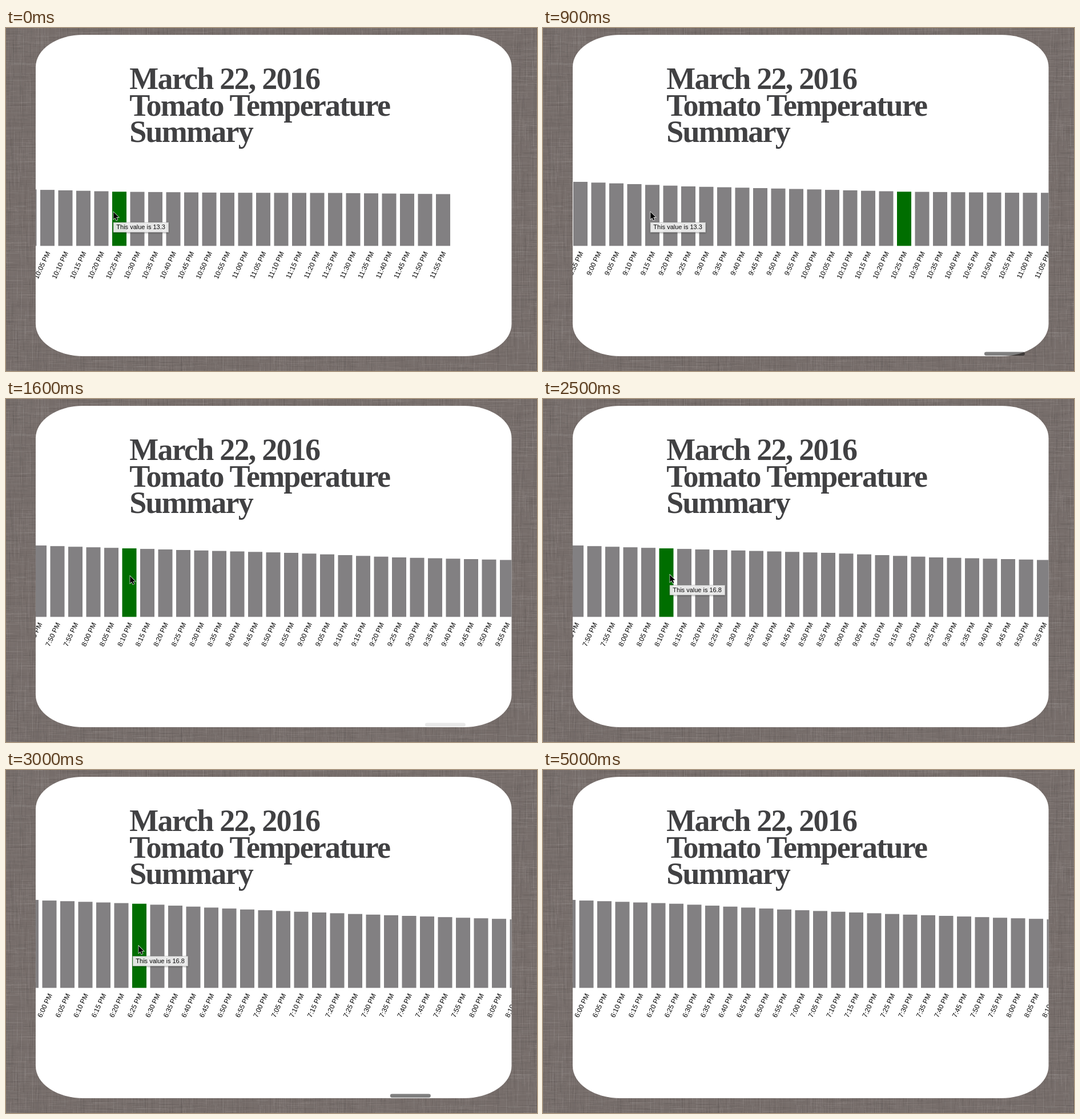
Recreate the animation shown at these times as an HTML page with a canvas. Size 930 by 602 pixels, loop 5.1 s.

```html
<!DOCTYPE html>
<html lang="en">
<head>
<meta charset="utf-8">
<title>Temperature Summary</title>
<style>
  html, body { margin: 0; width: 100%; height: 100%; overflow: hidden; background: #776e6b; }
  canvas, svg { position: absolute; left: 0; top: 0; width: 930px; height: 602px; display: block; }
  .title { font: bold 54px "Liberation Serif", Times, serif; letter-spacing: -1.75px; fill: #414143; }
  .label { font: 12px "Liberation Sans", Arial, sans-serif; text-anchor: end; }
  .tip text { font: 11px "Liberation Sans", Arial, sans-serif; }
  .tip rect { fill: #ececec; stroke: #c4c4c4; stroke-width: .6; }
  .tip { filter: drop-shadow(0 1.5px 1.5px rgba(0, 0, 0, .4)); opacity: .95; }
  .bar { fill: #828082; }
  .bar.hot { fill: #006e00; }
</style>
</head>
<body>
<canvas id="linen" width="930" height="602"></canvas>
<svg viewBox="0 0 930 602">
  <clipPath id="view"><rect x="52" y="12" width="833.5" height="564"/></clipPath>
  <rect x="52" y="12" width="833.5" height="564" rx="83.3" ry="56.4" fill="#fff"/>
  <g class="title">
    <text x="216.3" y="107">March 22, 2016</text>
    <text x="216.3" y="153.7">Tomato Temperature</text>
    <text x="216.3" y="200.4">Summary</text>
  </g>
  <g clip-path="url(#view)"><g id="chart"></g></g>
  <rect id="thumb" y="568.5" width="71" height="6.5" rx="3.2"/>
  <g id="tip" class="tip">
    <rect x=".3" y=".3" width="96.6" height="17"/>
    <text x="5.5" y="12.4"></text>
  </g>
  <path id="cursor" d="M0 0V12.6L2.9 9.9 4.9 14.6 7 13.7 5 9.1H9Z" stroke="#fff" stroke-width="1.3" paint-order="stroke"/>
</svg>
<script>
const LOOP = 5100, TICK = 100, STEP = 31.5, BAR = 25, COUNT = 73, BASE = 382.4;
const LEFT = 753 - (COUNT - 1) * STEP;
const PX_PER_DEGREE = 7.14;
const $ = id => document.getElementById(id);
const clamp = v => Math.min(1, Math.max(0, v));
const ease = p => (1 - Math.cos(Math.PI * clamp(p))) / 2;

function weave() {
  const ctx = $('linen').getContext('2d');
  let seed = 7;
  const rnd = () => (seed = (seed * 16807) % 2147483647) / 2147483647;
  ctx.fillStyle = '#776e6b';
  ctx.fillRect(0, 0, 930, 602);
  for (let i = 0; i < 16000; i++) {
    const x = Math.floor(rnd() * 990) - 60, y = Math.floor(rnd() * 662) - 60;
    const len = 8 + rnd() * 55, shade = rnd() < .5 ? 255 : 0;
    ctx.fillStyle = `rgba(${shade},${shade},${shade},${.02 + rnd() * .045})`;
    if (i % 2) ctx.fillRect(x, y, len, 1);
    else ctx.fillRect(x, y, 1, len);
  }
}

// Bar tops at every half hour from 5:55 PM, linear in between.
const tops = [228, 234.7, 244.8, 252.7, 259.3, 265, 270, 278, 282.5, 287.3, 289.1, 289.5, 291.5];

function topOf(i) {
  const k = Math.min(tops.length - 2, Math.floor(i / 6));
  return tops[k] + (tops[k + 1] - tops[k]) * (i / 6 - k);
}

function clock(i) {
  const min = 355 + i * 5;
  return `${Math.floor(min / 60)}:${String(min % 60).padStart(2, '0')} PM`;
}

function add(tag, attrs, text = '') {
  const el = document.createElementNS('http://www.w3.org/2000/svg', tag);
  for (const k in attrs) el.setAttribute(k, attrs[k]);
  el.textContent = text;
  $('chart').append(el);
  return el;
}

const bars = Array.from({ length: COUNT }, (_, i) => {
  const x = LEFT + i * STEP, y = topOf(i);
  add('text', { class: 'label', transform: `translate(${x + 17.7} 394.7) rotate(-65)` }, clock(i));
  return add('rect', { class: 'bar', x, y, width: BAR, height: BASE - y });
});

const flicks = [
  { start: 665, end: 1135, dist: 868 },
  { start: 2530, end: 3000, dist: 679 },
];
const moves = [
  { start: 1300, end: 1700, dx: 34, dy: -14.3 },
  { start: 2700, end: 3000, dx: 10, dy: 0 },
  { start: 3200, end: 3600, dx: 65, dy: 0 },
  { start: 3900, end: 4000, dx: 30, dy: 0 },
  { start: 4000, end: 4100, dx: 223, dy: 0 },
];
const tips = [{ start: 0, end: 1300 }, { start: 2100, end: 3200 }, { start: 3800, end: 4500 }];
const LEAVE = 4200;

const sum = (list, key, t) =>
  list.reduce((v, s) => v + s[key] * ease((t - s.start) / (s.end - s.start)), 0);
const during = (list, t) => list.find(s => t >= s.start && t < s.end);
const scrollAt = t => sum(flicks, 'dist', t);
const pointerAt = t => [188.3 + sum(moves, 'dx', t), 323 + sum(moves, 'dy', t)];

// The highlight waits while the chart scrolls or the pointer dashes away.
const busy = [...flicks, { start: 4000, end: LEAVE }];

function hoverAt(t) {
  if (t >= LEAVE) return -1;
  const seen = during(busy, t)?.start ?? t;
  const slot = (pointerAt(seen)[0] - scrollAt(seen) - LEFT) / STEP;
  return slot % 1 < BAR / STEP ? Math.floor(slot) : -1;
}

function thumbAlpha(t) {
  const last = flicks.findLast(f => t >= f.start);
  return last ? .5 * clamp((last.end + 500 - t) / 200) : 0;
}

const move = (el, x, y) => el.setAttribute('transform', `translate(${x} ${y})`);
const show = (el, on) => el.style.display = on ? '' : 'none';

function draw(t) {
  const dx = scrollAt(t), hot = hoverAt(t), tip = during(tips, t);
  move($('chart'), dx, 0);
  bars.forEach((bar, i) => bar.classList.toggle('hot', i === hot));

  show($('cursor'), t < LEAVE);
  move($('cursor'), ...pointerAt(t));

  show($('tip'), tip);
  if (tip) {
    const [x, y] = pointerAt(tip.start);
    const value = (BASE - topOf(hoverAt(tip.start))) / PX_PER_DEGREE;
    move($('tip'), x - .5, y + 18);
    $('tip').querySelector('text').textContent = `This value is ${value.toFixed(1)}`;
  }

  $('thumb').setAttribute('x', 812 - dx * .09);
  $('thumb').setAttribute('opacity', thumbAlpha(t));
}

let start, shown = 0;
function frame(now) {
  start ??= now;
  const t = Math.floor(((now - start) % LOOP) / TICK) * TICK;
  if (t !== shown) draw(shown = t);
  requestAnimationFrame(frame);
}

weave();
draw(0);
requestAnimationFrame(frame);
</script>
</body>
</html>
```
